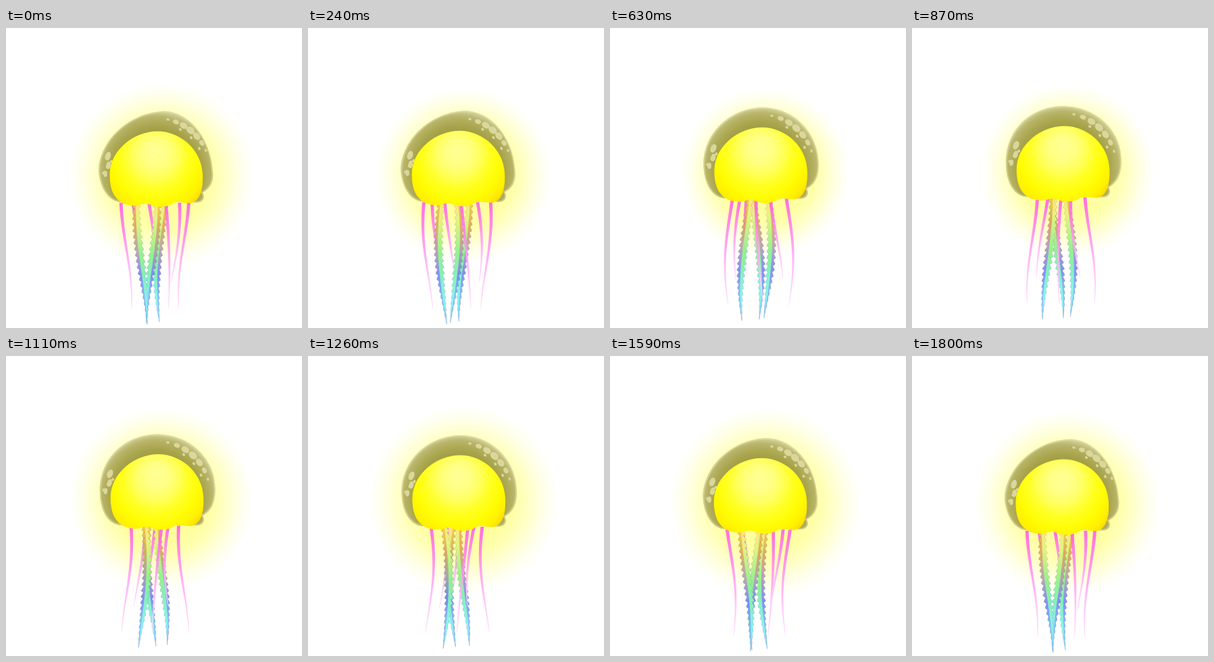
An HTML page with a canvas for the animation above (1830 ms loop, 438 by 443 pixels).

```html
<!DOCTYPE html>
<html lang="en">
<head>
<meta charset="utf-8">
<title>Jellyfish</title>
<style>
html, body { margin: 0; width: 100%; height: 100%; overflow: hidden; background: #fff; }
canvas { display: block; width: 438px; height: 443px; }
</style>
</head>
<body>
<canvas id="stage" width="438" height="443"></canvas>
<script>
const ctx = document.getElementById('stage').getContext('2d');
const LOOP = 1830, CYCLE = 1800, STEP = 30, TAU = Math.PI * 2;

const wave = (t, peak) => Math.cos((t - peak) / CYCLE * TAU);

// Spreads the colours evenly over a gradient
function shade(grad, colors) {
  colors.forEach((c, i) => grad.addColorStop(i / (colors.length - 1), c));
  return grad;
}

const PINK = ['#ff55e6', '#ff78ef', '#ffa2f4', '#ffc6fa', '#ffdcfc'];
const DARK = ['#f2cc3c', '#dca058', '#b09ab0', '#6f7ff6', '#78b8f6', '#6fb0f0'];
const LIGHT = Array.from({ length: 8 }, (_, i) => `hsl(${50 + 22 * i}, 96%, 76%)`);

// Strands: evenly spaced, the wave reaching the outer tips later
const strands = [157, 120, 115, 157, 118, 157].map((len, i) => {
  const d = i - 2.5;
  return { x: 178 + 17 * i, len, swing: 13 - .8 * d * d,
    peak: 960 + 190 * i, delay: 380 + 85 * d * d };
});

const arms = [300, 0, 850].map((peak, i) => (
  { x: 231 - 15 * i, len: 176 + 2 * i, swing: 8, peak, delay: 900, side: i < 2 ? 1 : -1 }));

// Swaying band; left and right give its half widths along s = 0..1
function ribbon(b, t, top, colors, left, right) {
  const n = 120, back = [];
  ctx.beginPath();
  for (let i = 0; i <= n; i++) {
    const s = i / n, y = top + s * b.len;
    const x = b.x + b.swing * wave(t, b.peak + b.delay * s);
    ctx.lineTo(x - left(s), y);
    back.unshift([x + right(s), y]);
  }
  back.forEach(p => ctx.lineTo(...p));
  ctx.closePath();
  ctx.fillStyle = shade(ctx.createLinearGradient(0, top, 0, top + b.len), colors);
  ctx.fill();
}

function drawArm(arm, t, top) {
  const core = s => 1 + 3.6 * Math.sin(Math.PI * Math.min(1, .2 + .8 * s));
  const outer = s => {
    const p = s * arm.len / 9 % 1;
    const tooth = 3.6 * (p < .7 ? p / .7 : (1 - p) / .3);
    return core(s) + tooth * Math.min(1, (1 - s) * 2.5) - 1;
  };
  const inner = s => core(s) * .2;
  ctx.globalAlpha = .88;
  ribbon(arm, t, top, DARK, outer, outer);
  ctx.lineWidth = .6;
  ctx.strokeStyle = 'rgba(100,100,130,.45)';
  ctx.stroke();
  ribbon(arm, t, top, LIGHT, ...(arm.side < 0 ? [inner, outer] : [outer, inner]));
  ctx.globalAlpha = 1;
}

function drawStrand(strand, t, top) {
  const half = s => 2.1 * Math.pow(1 - s, .7) + .4;
  ctx.globalAlpha = .85;
  ribbon(strand, t, top, PINK, half, half);
  ctx.globalAlpha = 1;
}

function drawGlow(t, lift) {
  const y = 218 - lift * 7, r = 134 + 9 * wave(t, 1480);
  const fade = [.38, .34, .25, .15, .06, 0].map(a => `rgba(255,255,0,${a})`);
  ctx.fillStyle = shade(ctx.createRadialGradient(230, y, 60, 230, y, r), fade);
  ctx.fillRect(0, 0, 438, 443);
}

// Hood leans left at rest and rounds out as it rises
function drawHood(k) {
  ctx.beginPath();
  ctx.moveTo(168, 257);
  ctx.bezierCurveTo(150, 255, 139, 234, 137 + 2 * k, 212 - 4 * k);
  ctx.bezierCurveTo(137 + k, 170 - 12 * k, 178 - 3 * k, 127 - 3 * k, 230 - 8 * k, 123);
  ctx.bezierCurveTo(272, 121 + 2 * k, 303 + 7 * k, 165 - 7 * k, 306 + 4 * k, 212 - 9 * k);
  ctx.bezierCurveTo(308 + 2 * k, 228 - 2 * k, 302, 237, 291, 243);
  ctx.bezierCurveTo(296, 252, 290, 260, 277, 257);
  ctx.closePath();
  ctx.fillStyle = shade(ctx.createRadialGradient(223, 213, 56, 223, 213, 91),
    ['#9f9b40', '#a5a148', '#aeaa56', '#bab66c', '#d8d5a2']);
  ctx.fill();
  ctx.save();
  ctx.clip();
  ctx.lineWidth = 4;
  ctx.strokeStyle = 'rgba(232,229,165,.5)';
  ctx.stroke();
  ctx.restore();
}

// A spot lying along the hood, by angle in degrees and distance
function spot(deg, dist, size, flat) {
  const a = deg * TAU / 360;
  ctx.beginPath();
  ctx.ellipse(223 + dist * Math.cos(a), 213 + dist * Math.sin(a),
    size, size * flat, a + Math.PI / 2, 0, TAU);
  ctx.fill();
}

function drawSpots(k) {
  ctx.fillStyle = '#dad79c';
  for (let i = 0; i < 7; i++) {
    spot(-78 + (9 + 1.2 * k) * i, 79.5, 2.4 + 4.4 * Math.sin(Math.PI * i / 6), .72);
  }
  for (let i = 0; i < 3; i++) {
    spot(-61 + 16 * i + 5 * k, 72, 2.3, .8);
    spot(198 - 10 * i + 7 * k, 76 - 4 * (i % 2), 6.6 - i, .62);
    spot(193 - 7 * i + 7 * k, 69 + 5 * i, 2.4, .8);
  }
}

function drawBody() {
  ctx.beginPath();
  ctx.moveTo(176, 260);
  ctx.bezierCurveTo(160, 254, 153, 238, 153.5, 215);
  ctx.bezierCurveTo(155, 179, 190, 152.5, 224, 152.5);
  ctx.bezierCurveTo(260, 152.5, 290, 182, 291, 216);
  ctx.bezierCurveTo(292, 242, 286, 256, 273, 258.5);
  ctx.quadraticCurveTo(265, 259, 258, 257);
  ctx.quadraticCurveTo(250, 256, 243, 261.5);
  ctx.quadraticCurveTo(231, 266, 217, 262.5);
  ctx.quadraticCurveTo(208, 257, 198, 261.5);
  ctx.quadraticCurveTo(186, 264, 176, 260);
  ctx.closePath();
  ctx.fillStyle = shade(ctx.createRadialGradient(222, 182, 4, 220, 197, 92),
    ['#ffff92', '#ffff84', '#ffff5c', '#ffff24', '#fffd04', '#fff000', '#ffc400']);
  ctx.fill();
}

function draw(t) {
  const lift = (1 + wave(t, 960)) / 2;
  const top = 258 - 8 * lift;
  ctx.fillStyle = '#fff';
  ctx.fillRect(0, 0, 438, 443);
  drawGlow(t, lift);
  strands.slice(0, 3).forEach(s => drawStrand(s, t, top));
  arms.forEach(a => drawArm(a, t, top));
  strands.slice(3).forEach(s => drawStrand(s, t, top));
  ctx.save();
  ctx.translate(0, -8 * lift);
  drawHood(lift);
  drawSpots(lift);
  ctx.translate(1.3 * lift, 0);
  drawBody();
  ctx.restore();
}

const start = performance.now();
function tick() {
  const t = (performance.now() - start) % LOOP;
  draw(Math.floor(t / STEP) * STEP);
  requestAnimationFrame(tick);
}
tick();
</script>
</body>
</html>
```
